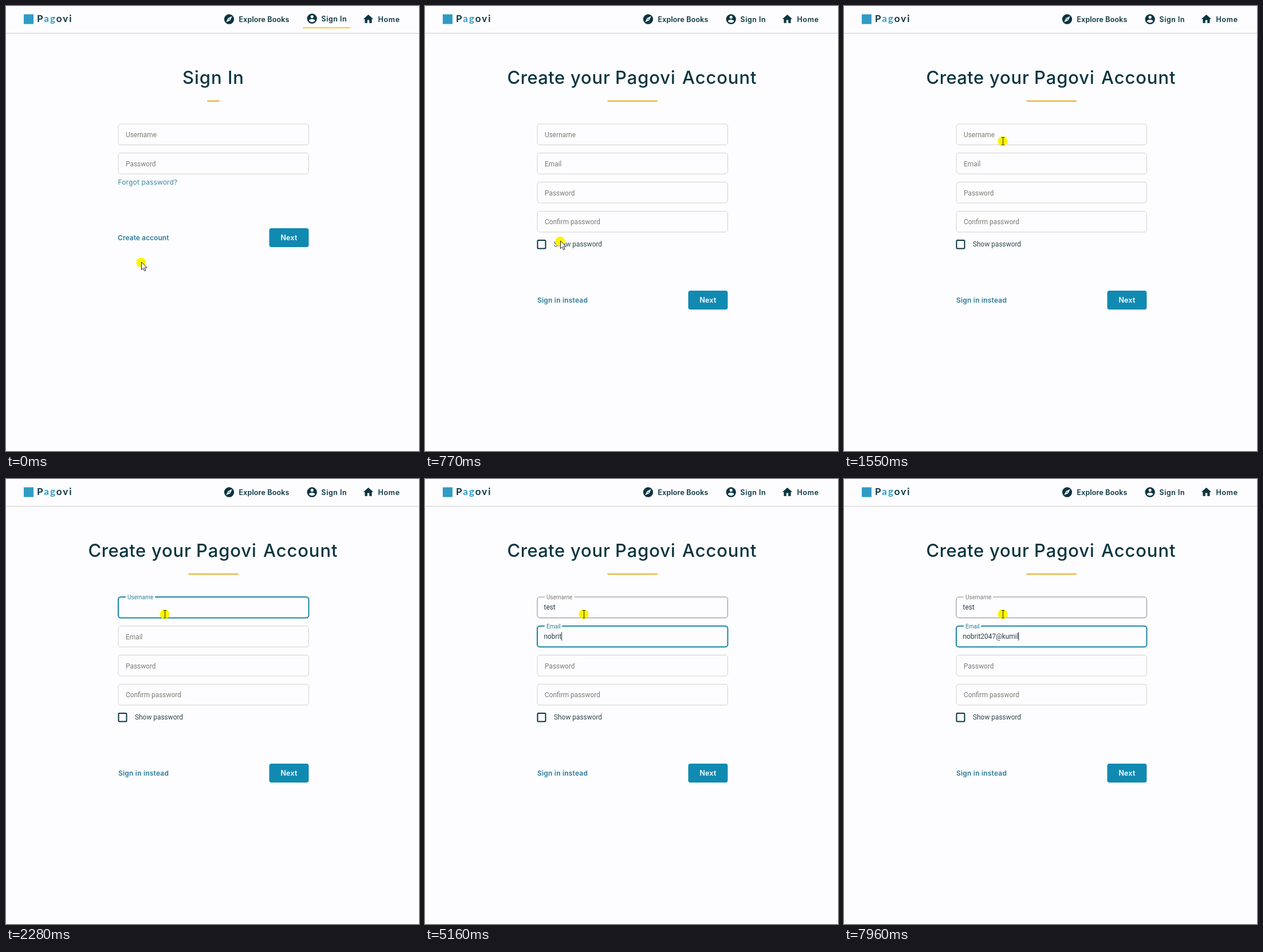
These frames come from a looping animation (721 by 777 pixels, 8 s). An HTML page:

```html
<!DOCTYPE html>
<html lang="en">
<head>
<meta charset="utf-8">
<title>Create account</title>
<style>
  html, body { margin: 0; width: 100%; height: 100%; overflow: hidden; background: #fdfdff; }
  svg { display: block; width: 100vw; height: 100vh; }
  text { white-space: pre; }
  .head { font-family: Inter, sans-serif; }
  .form { font-family: Roboto, sans-serif; }
  .logo { font-family: Lato, sans-serif; font-weight: 700; }
</style>
</head>
<body>
<svg id="stage" viewBox="0 0 721 777"></svg>
<script>
const LOOP = 8000, SWITCH = 640, FOCUS_NAME = 1720, FOCUS_MAIL = 3726, BLINK = 555;
const BG = '#fdfdff', INK = '#0b3541', BLUE = '#1b85a6', LINK = '#2b7b98', GREY = '#7b7a74';
const stage = document.getElementById('stage');

const nameText = 'test', nameKeys = [2800, 2870, 3010, 3180];
const mailText = 'nobrit2047@kumil';
const mailKeys = [4470, 4600, 4740, 4880, 5000, 5160, 5800, 6060, 6180, 6320, 6550,
  7200, 7400, 7600, 7870, 7930];

const clamp = v => Math.min(1, Math.max(0, v));
const lerp = (a, b, k) => a + (b - a) * k;
const span = (t, a, b) => clamp((t - a) / (b - a));
const smooth = k => k * k * (3 - 2 * k);
const out = k => 1 - (1 - k) * (1 - k);

const text = (cls, x, y, size, fill, str, extra = '') =>
  `<text class="${cls}" x="${x}" y="${y}" font-size="${size}" fill="${fill}" ${extra}>${str}</text>`;
const heading = (x, y, size, weight, fill, str, gap = 0, extra = '') =>
  text('head', x, y, size, fill, str, `font-weight="${weight}" letter-spacing="${gap}" ${extra}`);
const bar = (x, y, w, h, fill, r = 0) =>
  `<rect x="${x}" y="${y}" width="${w}" height="${h}" rx="${r}" fill="${fill}"/>`;
const box = (y, stroke = '#d3d1ca', w = 1) =>
  `<rect x="196" y="${y}" width="332.5" height="36.5" rx="4.5" fill="none" stroke="${stroke}" stroke-width="${w}"/>`;
const icon = (x, y, d) =>
  `<path transform="translate(${x} ${y}) scale(.87)" fill="${INK}" fill-rule="evenodd" d="${d}"/>`;

const disc = 'M12 2a10 10 0 1 0 0 20a10 10 0 1 0 0-20z';
const compass = disc + 'M14.2 14.2L6 18l3.8-8.2L18 6zM12 10.9a1.1 1.1 0 1 0 0 2.2a1.1 1.1 0 1 0 0-2.2z';
const person = disc + 'M12 5a3 3 0 1 1 0 6a3 3 0 1 1 0-6zM12 19.2c-2.5 0-4.7-1.3-6-3.2c0-2 4-3.1 6-3.1s6 1.1 6 3.1c-1.3 1.9-3.5 3.2-6 3.2z';
const house = 'M10 20v-6h4v6h5v-8h3L12 3L2 12h3v8z';

function header(active) {
  const lift = active ? 1 : 0;
  return bar(0, 47, 721, 1, '#cbcbc6') +
    bar(31, 14.5, 17, 17, '#2f9cc4') +
    text('logo', 54, 28, 17, INK, 'P<tspan fill="#2f9cc4">ag</tspan>ovi', 'letter-spacing="2"') +
    icon(379.1, 12.6, compass) + heading(406.5, 27.5, 12.5, 600, INK, 'Explore Books', .15) +
    icon(523.8, 12.6 - lift, person) + heading(550.5, 27.5 - lift, 12.5, 600, INK, 'Sign In', .5) +
    icon(622.1, 12.4, house) + heading(649.5, 27.5, 12.5, 600, INK, 'Home', .7) +
    (active ? bar(518, 36.7, 83, 2.6, '#f7cd6b', 1) : '');
}

const next = y => bar(459.5, y, 69, 33, '#118ab2', 4) +
  heading(494, y + 21, 12.5, 600, '#fff', 'Next', .2, 'text-anchor="middle"');
const prompt = (y, str) => text('form', 209, y + 23, 11.9, GREY, str);

function signIn() {
  return heading(362, 136, 31, 500, INK, 'Sign In', 1, 'text-anchor="middle"') +
    bar(351, 164.7, 22, 2.6, '#efb643', 1) +
    box(206) + prompt(206, 'Username') + box(256.7) + prompt(256.7, 'Password') +
    heading(195.5, 312, 12, 400, '#3b86a0', 'Forgot password?', .15) +
    heading(195, 408.5, 12, 600, LINK, 'Create account', .05) + next(388);
}

// Outlined field: the label floats into a notch, the value is typed behind a blinking caret.
function field(t, y, label, notch, focus, blur, value, keys) {
  if (t < focus) return box(y) + prompt(y, label);
  const k = out(span(t, focus, focus + 190));
  const focused = t < blur;
  const count = keys.filter(key => key <= t).length;
  const last = count ? keys[count - 1] : focus;
  const caret = focused && (t - last) % (2 * BLINK) < BLINK;
  const tinted = k > .5 && t < blur + 60;
  return box(y, focused ? BLUE : '#85847e', focused ? 2 : 1) +
    (k > .5 ? bar(209, y - 2, notch, 4, BG) : '') +
    text('form', lerp(222, 212, k), lerp(y + 22.8, y + 3.8, k), lerp(11.2, 10, k),
      tinted ? '#2f7f98' : GREY, label) +
    text('form', 207.5, y + 22, 11.9, '#2b3e44', value.slice(0, count) +
      (caret ? '<tspan id="end"> </tspan>' : '')) +
    (caret ? `<path id="caret" d="M208.5 ${y + 10.5}v15" stroke="#24383e"/>` : '');
}

function create(t) {
  const words = [['Create', 143.5, .4], ['your', 254, .8], ['Pagovi', 332, .9], ['Account', 449, .9]];
  return words.map(([w, x, gap]) => heading(x, 136, 31, 500, INK, w, gap)).join('') +
    bar(318.5, 164.7, 87.5, 2.6, '#efb643', 1) +
    field(t, 206, 'Username', 51, FOCUS_NAME, FOCUS_MAIL, nameText, nameKeys) +
    field(t, 256.7, 'Email', 30, FOCUS_MAIL, Infinity, mailText, mailKeys) +
    box(307.5) + prompt(307.5, 'Password') + box(358.3) + prompt(358.3, 'Confirm password') +
    `<rect x="196.5" y="409" width="14" height="14.5" rx="1.5" fill="none" stroke="${INK}" stroke-width="2"/>` +
    text('form', 225, 420.3, 11.9, '#2f464d', 'Show password') +
    heading(196, 517.5, 12, 600, LINK, 'Sign in instead', .2) + next(497);
}

function pointer(t) {
  const k = smooth(span(t, 950, 1550));
  const x = lerp(236, 277, k);
  const y = lerp(lerp(448, 411, smooth(span(t, 130, 500))), 236, k);
  const overField = t > SWITCH && [206, 256.7, 307.5, 358.3].some(top => y > top && y < top + 36.5);
  const shape = overField
    ? '<path d="M-2 -6.5h2.2q.4 0 .4 1v11q0 1 .4 1h2M-2 6.5h2.2M.6 -5.5q0-1 .4-1h2" fill="none" stroke="#222"/>'
    : '<path d="M.5 -1v13.5l3.1-2.8l2.1 4.9l2.3-1l-2.1-4.7h4.2z" fill="#fff" stroke="#222"/>';
  return `<g transform="translate(${x} ${y})"><circle r="8.5" fill="#fbf500"/>${shape}</g>`;
}

function draw(t) {
  const first = t < SWITCH;
  stage.innerHTML = bar(0, 0, 721, 777, BG) + header(first) + (first ? signIn() : create(t)) + pointer(t);
  const end = document.getElementById('end');
  if (end) {
    const x = Math.max(208.5, end.getStartPositionOfChar(0).x + .3);
    document.getElementById('caret').setAttribute('transform', `translate(${x - 208.5} 0)`);
  }
}

const start = performance.now();
function tick() {
  draw((performance.now() - start) % LOOP);
  requestAnimationFrame(tick);
}
tick();
</script>
</body>
</html>
```
